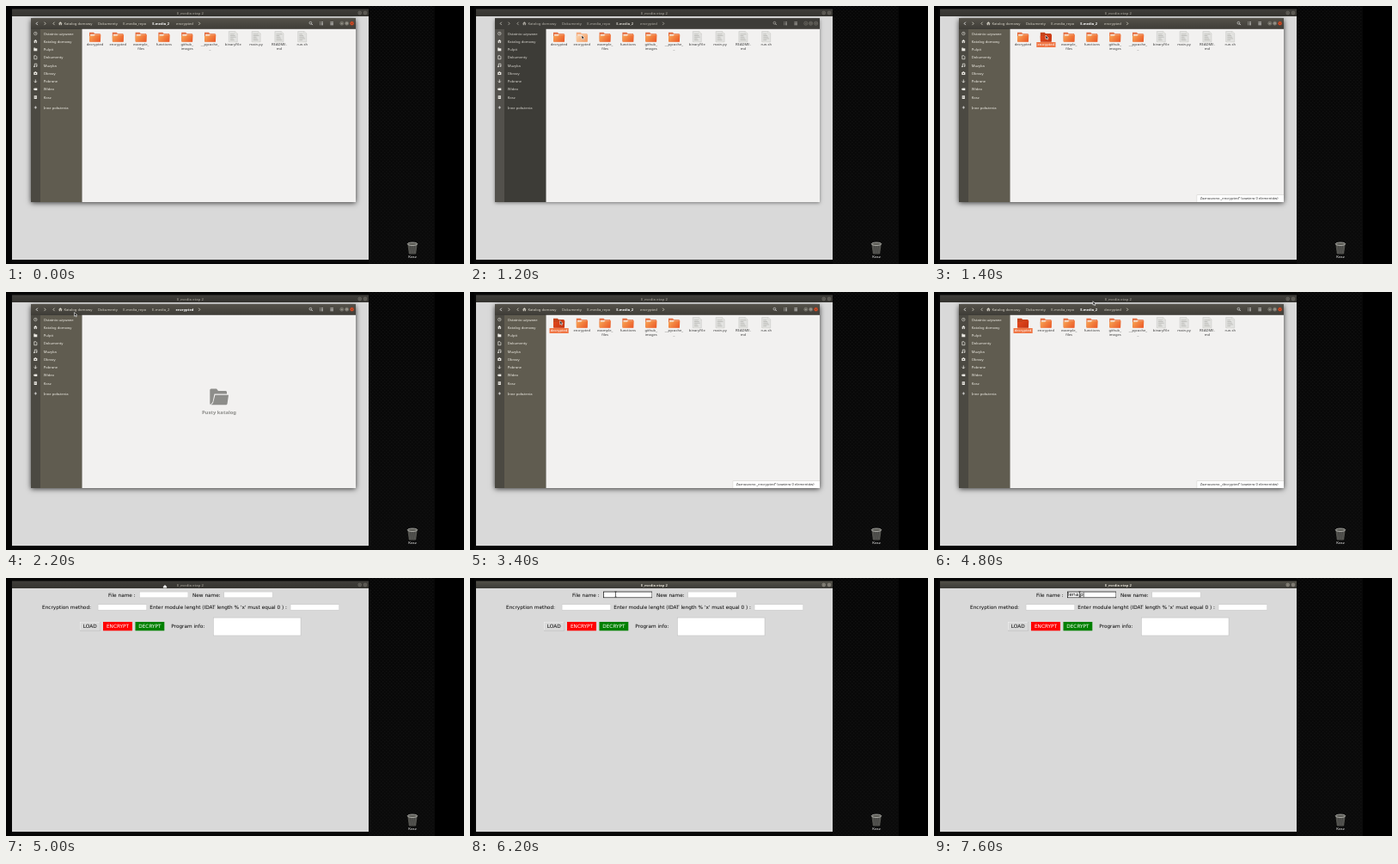
Animation, 533 px wide and 300 px high, one loop 8000 ms. Source, as an HTML page with a canvas:

```html
<!DOCTYPE html>
<html lang="pl">
<head>
<meta charset="utf-8">
<title>E_media etap 2</title>
<style>
html, body { margin: 0; width: 100%; height: 100%; overflow: hidden; background: #000; }
canvas { display: block; width: 533px; height: 300px; }
</style>
</head>
<body>
<canvas id="stage"></canvas>
<script>
const W = 533, H = 300, LOOP = 8000, STEP = 200;
const UI = '"Noto Sans", "Open Sans", sans-serif';
const TK = '"DejaVu Sans", sans-serif';
const canvas = document.getElementById('stage');
const dpr = window.devicePixelRatio || 1;
canvas.width = W * dpr;
canvas.height = H * dpr;
const c = canvas.getContext('2d');

// Helpers
function rect(x, y, w, h, fill) {
  c.fillStyle = fill;
  c.fillRect(x, y, w, h);
}
function fade(y0, y1, a, b) {
  const g = c.createLinearGradient(0, y0, 0, y1);
  g.addColorStop(0, a);
  g.addColorStop(1, b);
  return g;
}
function text(s, x, y, color, size = 4.2, weight = 400, align = 'left', family = UI) {
  c.font = `${weight} ${size}px ${family}`;
  c.textAlign = align;
  c.fillStyle = color;
  c.fillText(s, x, y);
}
function poly(points, fill, stroke, width = 0.5) {
  c.beginPath();
  points.forEach(([x, y], i) => i ? c.lineTo(x, y) : c.moveTo(x, y));
  c.closePath();
  if (fill) { c.fillStyle = fill; c.fill(); }
  if (stroke) { c.strokeStyle = stroke; c.lineWidth = width; c.stroke(); }
}
function line(points, color, width = 0.6) {
  c.beginPath();
  points.forEach(([x, y], i) => i ? c.lineTo(x, y) : c.moveTo(x, y));
  c.strokeStyle = color;
  c.lineWidth = width;
  c.stroke();
}
function dot(x, y, r, fill, stroke) {
  c.beginPath();
  c.arc(x, y, r, 0, Math.PI * 2);
  if (fill) { c.fillStyle = fill; c.fill(); }
  if (stroke) { c.strokeStyle = stroke; c.lineWidth = 0.5; c.stroke(); }
}

// Desktop
function desktop() {
  rect(0, 0, W, H, '#000');
  rect(0, 0, 499, H, '#060606');
  rect(422, 0, 77, H, fade(0, H, '#070707', '#0b0b0b'));
  c.fillStyle = '#121212';
  for (let y = 0; y < H; y += 2)
    for (let x = 422 + y % 4; x < 498; x += 4) c.fillRect(x, y, 1.6, 0.9);
  rect(0, 0, 5, H, '#020202');
  trash();
}
function trash() {
  poly([[468, 278], [478, 278], [476.7, 288], [469.3, 288]], '#3c3c3a', '#77776f', 0.6);
  for (let i = 0; i < 4; i++) line([[469.7 + i * 2.2, 279], [470.3 + i * 1.8, 287]], '#85857f', 0.5);
  c.beginPath();
  c.ellipse(473, 276.7, 5.7, 1.7, 0, 0, 7);
  c.fillStyle = '#55554f';
  c.fill();
  c.strokeStyle = '#c9c9c4';
  c.lineWidth = 0.8;
  c.stroke();
  text('Kosz', 473, 292.7, '#fff', 4.3, 400, 'center');
}

// Program window
function entry(x, y, focus) {
  rect(x, y, 57, 7.4, focus ? '#000' : '#cdcdcd');
  rect(x + 0.7, y + 0.7, 55.9, 6.1, '#fff');
}
function label(s, x, y, color = '#000', align = 'left') {
  text(s, x, y + 2, color, 5.78, 400, align, TK);
}
function program(t, active) {
  rect(7, 3.5, 415, 8.7, active ? fade(3, 12, '#55534b', '#3b3a36') : fade(3, 12, '#413f3b', '#34332f'));
  text('E_media etap 2', 214.5, 9.5, active ? '#e2ded2' : '#8b8880', 4.15, 700, 'center');
  for (const x of [411.7, 418]) {
    dot(x, 8, 1.9, active ? '#6b6860' : '#4a4843', active ? '#aaa69b' : '#85827a');
    line([[x - 0.8, 8], [x + 0.8, 8]], active ? '#d0ccc2' : '#9a978e', 0.5);
  }
  rect(7, 12, 415, 283, '#d9d9d9');

  const focus = t >= 5600;
  label('File name :', 119, 19.5);
  entry(155, 15.7, focus);
  label('New name:', 217, 19.5);
  entry(253.3, 15.7);
  label('Encryption method:', 42, 34);
  entry(106.7, 30.3);
  label("Enter module lenght (IDAT length % 'x' must equal 0 ) :", 167.3, 34);
  entry(330.7, 30.3);

  rect(86, 51, 24, 10.3, '#a5a5a5');
  rect(86, 51, 23.4, 9.7, '#f3f3f3');
  rect(86.5, 51.5, 22.9, 9.2, '#d9d9d9');
  label('LOAD', 97.7, 56.2, '#000', 'center');
  rect(113, 51, 34, 10.3, '#f00');
  label('ENCRYPT', 130, 56.2, '#fff', 'center');
  rect(150.5, 51, 33.8, 10.3, '#008000');
  label('DECRYPT', 167.4, 56.2, '#fff', 'center');
  label('Program info:', 192.3, 56.2);
  rect(241, 45.8, 102.3, 21.4, '#bdbdbd');
  rect(241.6, 46.4, 101.2, 20.3, '#fff');

  if (focus) {
    const typed = 'lena.p'.slice(0, keystrokes(t));
    label(typed, 155.9, 19.4);
    if (t < 6200 || t >= 6400) {
      c.font = `5.78px ${TK}`;
      rect(156 + c.measureText(typed).width, 16.7, 0.6, 5.6, '#000');
    }
  }
}
function keystrokes(t) {
  return [6400, 6600, 6900, 7000, 7400, 7600].filter(k => t >= k).length;
}

// File manager
const places = ['Ostatnio używane', 'Katalog domowy', 'Pulpit', 'Dokumenty', 'Muzyka',
  'Obrazy', 'Pobrane', 'Wideo', 'Kosz'];
const files = [['decrypted'], ['encrypted'], ['example_', 'files'], ['functions'],
  ['github_', 'images'], ['__pycache_', '_'], ['binaryFile'], ['main.py'], ['README.', 'md'], ['run.sh']];

function placeIcon(i, x, y, col) {
  const draw = [
    () => { dot(x, y, 1.8, null, col); line([[x, y - 1], [x, y], [x + 1, y]], col, 0.5); },
    () => { poly([[x - 2.3, y], [x, y - 2.2], [x + 2.3, y]], col); rect(x - 1.6, y, 1.2, 1.8, col); rect(x + 0.4, y, 1.2, 1.8, col); },
    () => { rect(x - 2, y - 1.2, 4, 3, col); rect(x - 2, y - 1.9, 1.8, 1, col); },
    () => poly([[x - 1.5, y - 2], [x + 0.6, y - 2], [x + 1.6, y - 1], [x + 1.6, y + 2], [x - 1.5, y + 2]], null, col, 0.7),
    () => { line([[x - 1, y + 1.4], [x - 1, y - 1.8], [x + 1.6, y - 1.8], [x + 1.6, y + 1]], col, 0.7); dot(x - 1.4, y + 1.4, 0.8, col); dot(x + 1.2, y + 1, 0.8, col); },
    () => { rect(x - 2, y - 1.3, 4, 3.1, col); rect(x - 0.8, y - 2, 1.6, 1, col); dot(x, y + 0.2, 0.8, '#4b4942'); },
    () => { line([[x, y - 2], [x, y + 1.5]], col, 0.8); line([[x - 1.5, y], [x, y + 1.6], [x + 1.5, y]], col, 0.8); },
    () => { rect(x - 1.2, y - 1.2, 3.2, 2.5, col); poly([[x - 1.2, y], [x - 2.3, y - 1.2], [x - 2.3, y + 1.2]], col); },
    () => { rect(x - 1.6, y - 1.8, 3.2, 3.8, col); for (const d of [-0.7, 0.5]) line([[x - 1, y + d], [x + 1, y + d]], '#4b4942', 0.4); }
  ];
  draw[i]();
}
function folder(x, y, selected, hover) {
  const top = selected ? '#c4431c' : hover ? '#f5a878' : '#e4683a';
  const a = selected ? '#e2491f' : hover ? '#fbd2a8' : '#f7a354';
  const b = selected ? '#c5330f' : hover ? '#f29a63' : '#ec5a27';
  poly([[x - 6.5, y - 5.6], [x - 1.6, y - 5.6], [x - 0.4, y - 4.4], [x + 6, y - 4.4], [x + 6, y + 5], [x - 6.5, y + 5]], top);
  if (!selected) rect(x - 5.5, y - 3.6, 11, 3, '#f6ddca');
  const g = c.createLinearGradient(x - 5, y - 3, x + 5, y + 6);
  g.addColorStop(0, a);
  g.addColorStop(1, b);
  poly([[x - 6.6, y - 1.6], [x - 1, y - 1.6], [x + 0.5, y - 3], [x + 6.8, y - 3], [x + 6.4, y + 5.5], [x - 6.2, y + 5.5]], g);
}
function page(x, y, kind) {
  poly([[x - 5, y - 6.2], [x + 2.4, y - 6.2], [x + 5, y - 3.6], [x + 5, y + 6], [x - 5, y + 6]], '#e3e3e1', '#c2c2be');
  poly([[x + 2.4, y - 6.2], [x + 2.4, y - 3.6], [x + 5, y - 3.6]], '#f7f7f6', '#c2c2be', 0.4);
  for (let r = 0; r < 5; r++)
    line([[x - 3.4, y - 3 + r * 1.7], [x + 3.4 - (r * 7 + kind * 3) % 4, y - 3 + r * 1.7]], '#a9a9a5', 0.6);
}
function listing(s) {
  files.forEach((name, i) => {
    const x = 103.5 + 26.8 * i, sel = s.selected === name[0];
    if (i < 6) folder(x, 36.3, sel, s.hover === name[0]);
    else page(x, 35.8, i);
    if (sel) rect(x - 11, 42, 22.2, 6, '#f07746');
    name.forEach((row, n) => text(row, x, 46.4 + n * 5, sel ? '#fff' : '#3d3d3d', 4.15, 400, 'center'));
  });
  if (s.status) {
    rect(305.7, 219.5, 101.3, 8.5, '#d2d0cc');
    rect(306.2, 220, 100.8, 8, '#fff');
    text(`Zaznaczono „${s.status}” (zawiera 0 elementów)`, 309.7, 225.3, '#333', 4.12);
  }
}
function emptyPage() {
  const col = '#8d8d8a';
  poly([[237.3, 113.5], [238.5, 112.5], [245, 112.5], [247, 115], [256, 115], [257, 116], [257, 118.5], [242.5, 118.5], [240.5, 128], [238, 131], [237.3, 130]], col);
  poly([[243.4, 119.8], [259, 119.8], [257.5, 130.3], [256.5, 131.2], [238.8, 131.2], [241, 129]], col);
  text('Pusty katalog', 248, 141.8, col, 5.85, 700, 'center');
}
function manager(s) {
  const on = s.focused;
  c.save();
  c.shadowColor = on ? 'rgba(0,0,0,.75)' : 'rgba(0,0,0,.45)';
  c.shadowBlur = (on ? 6 : 4) * dpr;
  c.shadowOffsetY = dpr;
  rect(29, 14.5, 378, 213.5, '#3c3b37');
  c.restore();

  rect(29, 14.2, 378, 12.6, on ? fade(14, 27, '#55524a', '#3e3c37') : '#3d3c38');
  rect(29, 27, 11, 201, on ? '#4b4942' : '#53514c');
  rect(40, 27, 48.5, 201, on ? '#605c50' : '#3d3c37');
  rect(88.5, 26.8, 318.5, 201.2, '#f2f1f0');

  const soft = on ? '#d6d2c6' : '#b3b0a8', strong = on ? '#fff' : '#d4d1ca';
  places.forEach((name, i) => {
    const y = 32 + i * 9.25;
    placeIcon(i, 34.3, y, '#eeece6');
    text(name, 43.8, y + 1.6, on ? '#f0eee6' : '#d8d6d0', 4.15);
  });
  line([[32.8, 118], [36, 118]], '#eee', 0.7);
  line([[34.4, 116.4], [34.4, 119.6]], '#eee', 0.7);
  text('Inne położenia', 43.8, 119.6, on ? '#f0eee6' : '#d8d6d0', 4.15);

  // Header bar
  const chevron = (x, d, col) => line([[x - d * 0.8, 18.7], [x + d * 0.8, 20.4], [x - d * 0.8, 22.1]], col, 0.8);
  chevron(36, -1, strong);
  chevron(45.3, 1, soft);
  chevron(55.7, -1, soft);
  chevron(225, 1, soft);
  placeIcon(1, 63.3, 20.4, soft);
  text('Katalog domowy', 67.4, 22, soft);
  text('Dokumenty', 107, 22, soft);
  text('E-media_repo', 136.3, 22, soft);
  text('E-media_2', 180.2, 22, s.open ? soft : strong, s.open ? 4.2 : 4, s.open ? 400 : 700, 'center');
  text(s.child, 208, 22, s.open ? strong : soft, s.open ? 4.1 : 4.2, s.open ? 700 : 400, 'center');
  dot(354.4, 19.7, 1.4, null, strong);
  line([[355.3, 20.6], [356.8, 22.1]], strong, 0.8);
  for (let i = 0; i < 3; i++) {
    const y = 18.8 + i * 1.5;
    line([[365.3, y], [366, y]], strong);
    line([[366.8, y], [369, y]], strong);
    line([[377.4, y], [381, y]], strong);
  }
  [390.8, 396.6, 402.6].forEach((x, i) => {
    const close = on && i === 2;
    dot(x, 20.2, 2.1, close ? '#e2542b' : on ? '#6d6a61' : '#45433f', close ? '#a83a1b' : '#85827a');
    const col = close ? '#512012' : on ? '#d8d5cc' : '#8c8982';
    if (i === 0) line([[x - 0.9, 20.4], [x + 0.9, 20.4]], col, 0.5);
    if (i === 1) poly([[x - 0.8, 19.4], [x + 0.8, 19.4], [x + 0.8, 21], [x - 0.8, 21]], null, col, 0.4);
    if (i === 2) {
      line([[x - 0.8, 19.4], [x + 0.8, 21]], col, 0.5);
      line([[x + 0.8, 19.4], [x - 0.8, 21]], col, 0.5);
    }
  });
  s.open ? emptyPage() : listing(s);
}

// Pointer path: time, x, y
const path = [[200, 196, 4], [1000, 130, 34], [1600, 130, 34], [2200, 79.5, 23.7], [2700, 180, 19.5],
  [2800, 180, 19.5], [3400, 104.7, 33.3], [3800, 104.7, 33.3], [4400, 182, 19.5], [4800, 185, 10.7],
  [5000, 185, 8], [5200, 183, 3], [5800, 169.5, 19], [LOOP, 169.5, 19]];

function pointerAt(t) {
  const i = path.findIndex(p => p[0] > t);
  const a = path[Math.max(0, i - 1)], b = path[Math.max(0, i)];
  const k = a === b ? 0 : (t - a[0]) / (b[0] - a[0]);
  const e = k * k * (3 - 2 * k);
  return [a[1] + (b[1] - a[1]) * e, a[2] + (b[2] - a[2]) * e];
}
function pointer(t) {
  if (t < 200) return;
  const [x, y] = pointerAt(t);
  if (t >= 5600) {
    line([[x, y - 3], [x, y + 3]], '#222', 0.7);
    for (const d of [-3.1, 3.1]) line([[x - 1.2, y + d], [x + 1.2, y + d]], '#222', 0.6);
  } else if (t === 5000) {
    poly([[x - 2.3, y + 2.2], [x, y], [x + 2.3, y + 2.2], [x + 1.8, y + 3.4], [x - 1.8, y + 3.4]], '#f4f4f4');
  } else {
    poly([[x, y], [x, y + 4.5], [x + 1.1, y + 3.6], [x + 1.9, y + 5.2], [x + 2.7, y + 4.8], [x + 1.9, y + 3.3], [x + 3.2, y + 3.2]],
      '#111', '#fff', 0.6);
  }
}

function stateAt(t) {
  const s = { focused: t < 600 || t >= 1400, child: t < 3600 ? 'encrypted' : 'decrypted' };
  s.open = (t >= 1600 && t < 2800) || (t >= 3600 && t < 4400);
  if (t >= 1000 && t < 1400) s.hover = 'encrypted';
  if (t >= 1400) s.selected = t < 3400 ? 'encrypted' : 'decrypted';
  if (t >= 1400) s.status = t < 3600 ? 'encrypted' : 'decrypted';
  return s;
}

function render(now) {
  const t = Math.floor((now % LOOP) / STEP) * STEP;
  c.setTransform(dpr, 0, 0, dpr, 0, 0);
  desktop();
  program(t, t >= 5200);
  if (t < 5000) manager(stateAt(t));
  pointer(t);
}

const start = performance.now();
function tick() {
  render(performance.now() - start);
  requestAnimationFrame(tick);
}
tick();
</script>
</body>
</html>
```
